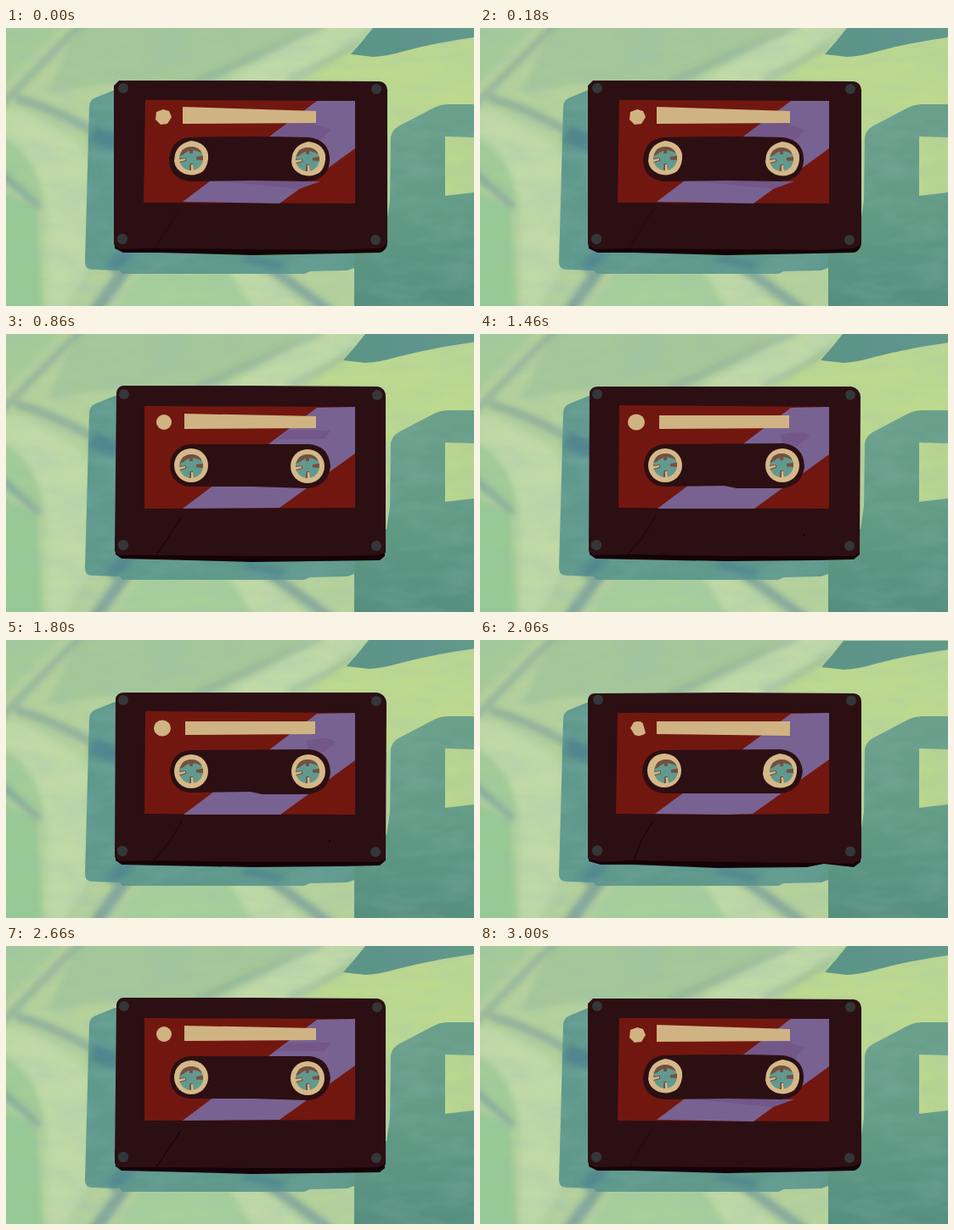
Recreate the animation shown at these times as an HTML page without scripts. Size 551 px wide and 328 px high, loop 3.02 s.

```html
<!DOCTYPE html>
<html lang="en">
<head>
<meta charset="utf-8">
<title>Cassette</title>
<style>
html, body { margin: 0; width: 100%; height: 100%; overflow: hidden; background: #b5d19c; }
svg { display: block; width: 551px; height: 328px; }
.pose { visibility: hidden; animation: 3020ms step-end infinite; }
.a { animation-name: a; }
.b { animation-name: b; }
.c { animation-name: c; }
.d { animation-name: d; }
.e { animation-name: e; }
@keyframes a { 0%, 90% { visibility: visible; } 10% { visibility: hidden; } }
@keyframes b { 0%, 20%, 70% { visibility: hidden; } 10%, 60% { visibility: visible; } }
@keyframes c { 0%, 30%, 90% { visibility: hidden; } 20%, 80% { visibility: visible; } }
@keyframes d { 0%, 60% { visibility: hidden; } 40% { visibility: visible; } }
@keyframes e { 0%, 40%, 80% { visibility: hidden; } 30%, 70% { visibility: visible; } }
.body { fill: #2c0f12; }
.edge { fill: #140207; }
.label { fill: #72170f; }
.stripe { fill: #786292; }
.shade { fill: #725788; }
.cream { fill: #d0b383; }
.seam { fill: none; stroke: #180509; stroke-width: 1.3; }
</style>
</head>
<body>
<svg viewBox="0 0 551 328">
  <defs>
    <filter id="soft" x="-30%" y="-30%" width="160%" height="160%"><feGaussianBlur stdDeviation="3.5"/></filter>
    <filter id="paint" x="0" y="0" width="100%" height="100%">
      <feTurbulence type="fractalNoise" baseFrequency=".018 .05" numOctaves="3" seed="4"/>
      <feColorMatrix values="0 0 0 0 .3  0 0 0 0 .5  0 0 0 0 .5  1.6 0 0 0 -.62"/>
    </filter>
    <linearGradient id="teal" x2="0" y2="1">
      <stop offset="0" stop-color="#6ba08b"/>
      <stop offset=".5" stop-color="#629b85"/>
      <stop offset="1" stop-color="#558f7f"/>
    </linearGradient>
    <linearGradient id="leafTone">
      <stop offset="0" stop-color="#5b9585"/>
      <stop offset=".5" stop-color="#5f948d"/>
      <stop offset="1" stop-color="#629b88"/>
    </linearGradient>
    <path id="leaf" fill="url(#leafTone)" d="M406 31 Q419 17 432 0 H570 V8 L551 11 Q508 17 470 27 Q446 34 432 34Z"/>
    <path id="spoke" fill="#75503f" d="M-2.6 -14 H2.6 L1.8 -6 H-1.8Z"/>
    <g id="hub">
      <circle r="14" fill="#62998f"/>
      <path fill="#75503f" d="M-13.5 -3 Q-11 -14 0 -14 Q10 -14 12.5 -6 Q0 -14 -9 -5Z"/>
      <use href="#spoke"/>
      <use href="#spoke" transform="rotate(87)"/>
      <use href="#spoke" transform="rotate(178)"/>
      <use href="#spoke" transform="rotate(260)"/>
      <path fill="#d5b888" d="M-14 1 L-7 0 V2 L-14 4Z M0 7 H2 L3 14 H0Z"/>
    </g>
    <g id="screws" fill="#333739">
      <circle cx="138" cy="71" r="6"/>
      <circle cx="436" cy="72" r="6"/>
      <circle cx="137" cy="249" r="6.2"/>
      <circle cx="435" cy="250" r="6"/>
    </g>
    <path id="rim" fill="#d5b888" d="M-19 -5 Q-15 -18 0 -21 Q17 -19 20 -5 Q21 7 14 15 Q4 22 -8 18 Q-19 13 -20 3Z"/>
    <circle id="disc" r="20" fill="#d5b888"/>
  </defs>

  <!-- painted ground -->
  <rect width="551" height="328" fill="#b5d19c"/>
  <g filter="url(#soft)">
    <path fill="#a5c799" d="M92 -20 H390 L240 65 H125 L50 75Z"/>
    <path fill="#a6cb99" d="M-20 -20 H85 L-20 85Z"/>
    <path fill="#c0d9a7" d="M250 68 L378 -10 H440 L330 70Z"/>
    <path fill="#bdd98f" d="M345 65 L415 20 L570 10 V130 H440 V65Z"/>
    <path fill="#a2cc98" d="M-20 120 L30 150 L45 205 L-20 175Z"/>
    <path fill="#97ca93" d="M-20 185 L36 212 L44 345 H-20Z"/>
    <path fill="#c0d9a6" d="M-10 94 Q55 102 98 150 L96 285 L60 345 H48 L48 215 Q40 150 -10 122Z"/>
    <path fill="#a7cf9a" d="M160 285 H262 L300 345 H120Z"/>
    <path fill="#c0d9a6" d="M262 285 H302 L366 345 H300Z"/>
  </g>
  <g filter="url(#soft)" fill="none" stroke="#7b9f9b" stroke-linecap="round">
    <path d="M88 -5 Q45 40 -5 90" stroke-width="8" opacity=".55"/>
    <path d="M15 84 Q60 95 125 135" stroke-width="10" opacity=".65"/>
    <path d="M-5 172 L37 209" stroke-width="8" opacity=".75"/>
    <path d="M142 283 L104 335" stroke-width="14" opacity=".85"/>
    <path d="M298 273 L382 335" stroke-width="12" opacity=".8"/>
    <path d="M225 64 L372 -2" stroke-width="7" opacity=".4"/>
    <path d="M335 60 L410 22" stroke-width="6" opacity=".35"/>
  </g>

  <!-- cast shapes -->
  <path fill="url(#teal)" d="M453 129 Q454 121 462 116 L500 96 Q510 90 520 90 H551 V328 H410 V230 H448 L452 203Z"/>
  <path fill="#bad68f" d="M517 128 L551 129 V194 L517 198Z"/>
  <path fill="#5f998c" d="M150 73 H128 L106 82 Q98 85 98 93 L93 276 Q93 285 102 285 L134 286 L137 290 H351 L358 287 L402 286 L410 283 V250 H150Z"/>
  <g filter="url(#soft)" fill="none" stroke="#4d8190">
    <path d="M102 124 L132 139" stroke-width="20" opacity=".75"/>
    <path d="M149 260 L122 284" stroke-width="15" opacity=".7"/>
    <path d="M280 272 L325 283" stroke-width="13" opacity=".6"/>
  </g>
  <rect width="551" height="328" filter="url(#paint)" opacity=".3"/>

  <g class="pose a">
    <use href="#leaf"/>
    <path class="edge" d="M127 240 L128 260 L138 265 L180 265 L290 268 L395 266 L440 265 Q448 263 449 254 V240Z"/>
    <path class="body" d="M127 68 L133 62 L290 62 L440 63 Q448 64 449 73 V255 L440 260 L395 262 L290 261 L175 260 L134 261 L127 255Z"/>
    <path class="label" d="M164 85 L411 86 V207 L162 206Z"/>
    <path class="stripe" d="M366 86 H411 V142 L322 207 L208 205Z"/>
    <path class="shade" d="M340 105 L382 120 L366 138 L310 130Z M247 180 L370 181 L345 190Z"/>
    <path class="cream" d="M208 93 L365 98 V112 L208 113Z M185 96 L192 98 L195 105 L190 113 L182 114 L176 108 L177 99Z"/>
    <path class="body" d="M217 129 Q290 127 356 129 C374 131 382 142 381 157 C380 172 370 180 354 181 L290 180 L218 181 C202 180 192 171 192 155 Q194 131 217 129Z"/>
    <use href="#rim" x="218" y="154"/><use href="#hub" x="218" y="154"/>
    <use href="#rim" x="356" y="155"/><use href="#hub" x="355" y="155"/>
    <path class="seam" d="M204 214 L176 259" opacity=".4"/>
    <use href="#screws"/>
  </g>

  <g class="pose b">
    <use href="#leaf" x="-4" y="1"/>
    <path class="edge" d="M127 240 L128 261 L142 265 L180 265 L280 269 L385 268 L405 264 L440 268 L448 262 V240Z"/>
    <path class="body" d="M127 71 Q128 63 135 63 L290 62 L440 63 Q449 64 449 73 V258 L440 264 L400 263 L290 262 L180 260 L140 262 L127 258Z"/>
    <path class="label" d="M162 86 H411 V205 L290 206 L160 205Z"/>
    <path class="stripe" d="M366 87 L411 86 V141 L321 205 L290 206 L206 205Z"/>
    <path class="cream" d="M208 96 H365 V113 L208 111Z M181 97 Q190 94 192 99 L195 110 Q189 115 182 112 L177 104Z"/>
    <path class="body" d="M214 130 L352 129 Q376 130 380 154 Q378 178 354 181 L216 181 Q193 178 191 155 Q193 133 214 130Z"/>
    <use href="#disc" x="217" y="154"/><use href="#hub" x="219" y="155"/>
    <use href="#rim" x="353" y="155"/><use href="#hub" x="355" y="155"/>
    <path class="seam" d="M203 215 L190 237 L180 262"/>
    <use href="#screws" x="1" y="-.5"/>
  </g>

  <g class="pose c">
    <use href="#leaf" x="-9"/>
    <path class="edge" d="M128 240 L129 260 L136 265 L178 266 L290 269 L440 267 L446 262 V240Z"/>
    <path class="body" d="M130 69 Q132 60 140 61 L290 61 L438 62 Q447 64 447 74 L447 258 L437 261 L390 262 L290 262 L180 261 L132 261 L128 256Z"/>
    <path class="label" d="M163 85 L411 86 V205 L163 206Z"/>
    <path class="stripe" d="M366 87 L411 86 V141 L322 205 L208 206Z"/>
    <path class="shade" d="M332 114 H382 L375 124 L320 124Z"/>
    <path class="cream" d="M210 94 L365 97 V111 L210 112Z"/>
    <circle class="cream" cx="186" cy="104" r="9"/>
    <path class="body" d="M217 130 H357 Q380 132 382 156 Q379 180 355 182 L290 180 L217 180 Q194 178 193 155 Q195 132 217 130Z"/>
    <use href="#disc" x="218" y="155"/><use href="#hub" x="218" y="156"/>
    <use href="#disc" x="355" y="156"/><use href="#hub" x="355" y="156"/>
    <path class="seam" d="M206 217 L177 261"/>
    <use href="#screws" x="1"/>
  </g>

  <g class="pose d">
    <use href="#leaf" x="-5"/>
    <path class="edge" d="M128 240 L129 260 L136 265 L180 266 L290 268 L395 267 L440 266 L447 260 V240Z"/>
    <path class="body" d="M129 70 Q130 62 139 62 L290 62 L437 62 Q447 64 448 74 L447 258 L440 262 L290 262 L180 260 L133 261 L128 256Z"/>
    <path class="label" d="M164 84 L411 86 V206 L163 205Z"/>
    <path class="stripe" d="M366 87 L411 86 V142 L323 206 L209 206Z"/>
    <path class="shade" d="M354 119 Q382 112 388 121 L374 132 H356Z"/>
    <path class="cream" d="M211 96 H364 V111 L211 112Z"/>
    <ellipse class="cream" cx="184" cy="104" rx="10" ry="9.5"/>
    <path class="body" d="M217 130 L357 129 Q381 132 382 156 Q380 179 356 182 L302 182 L287 179 L217 180 Q194 178 193 154 Q195 132 217 130Z"/>
    <use href="#disc" x="218" y="155"/><use href="#hub" x="218" y="155"/>
    <use href="#disc" x="356" y="155"/><use href="#hub" x="355" y="155"/>
    <path class="seam" d="M207 214 L192 239 L174 260" opacity=".75"/>
    <circle class="edge" cx="381" cy="237" r="1.2"/>
    <use href="#screws"/>
  </g>

  <g class="pose e">
    <use href="#leaf" x="-4" y="1"/>
    <path class="edge" d="M127 240 L128 260 L137 266 L180 264 L240 267 L395 268 L440 266 L447 260 V240Z"/>
    <path class="body" d="M128 69 L134 63 L157 61 L290 61 L425 64 L438 62 Q447 64 447 74 V258 L437 264 L395 263 L290 261 L180 261 L134 262 L127 256Z"/>
    <path class="label" d="M164 83 L411 86 V207 L162 206Z"/>
    <path class="stripe" d="M366 87 L411 86 V142 L322 207 L285 205 L208 206Z"/>
    <path class="shade" d="M340 105 L386 108 L365 130 H315Z M250 180 L355 181 L320 184Z"/>
    <path class="cream" d="M209 94 L364 97 V113 L209 112Z"/>
    <path class="cream" d="M183 95 Q193 95 194 103 Q193 112 186 114 Q178 113 176 105Z"/>
    <path class="body" d="M217 130 L287 128 L312 131 H357 Q380 133 382 156 Q379 179 355 181 L290 179 L217 180 Q194 178 192 155 Q195 132 217 130Z"/>
    <use href="#rim" x="218" y="154"/><use href="#hub" x="218" y="155"/>
    <use href="#disc" x="355" y="155"/><use href="#hub" x="355" y="155"/>
    <path class="seam" d="M210 210 L192 238 L175 263"/>
    <use href="#screws" y=".5"/>
  </g>
</svg>
</body>
</html>
```
